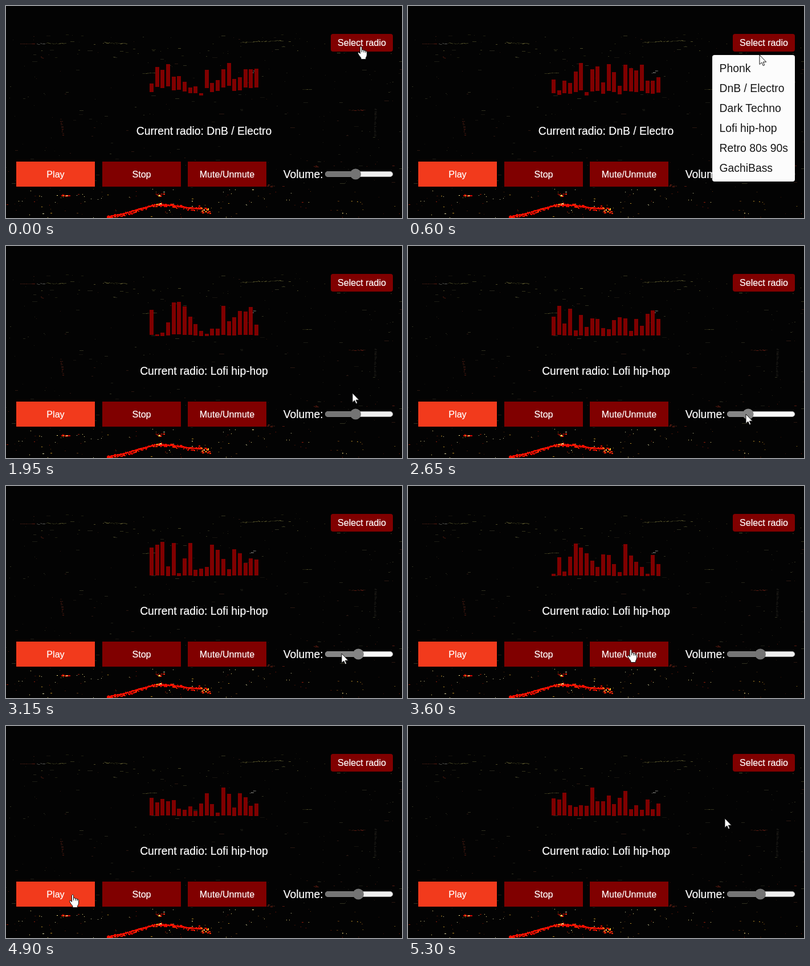
An HTML page for the animation above (5.35 s loop, 695 px wide and 372 px high).

```html
<!DOCTYPE html>
<html lang="en">
<head>
<meta charset="utf-8">
<title>Radio player</title>
<style>
html, body { margin: 0; width: 100%; height: 100%; overflow: hidden; background: #030303; }
svg { display: block; width: 695px; height: 372px; font-family: "Liberation Sans", Arial, sans-serif; }
text { fill: #fff; stroke: #fff; stroke-width: .2px; font-size: 16.1px; }
.big { font-size: 19.35px; }
.mid { text-anchor: middle; }
#menu text { fill: #161616; stroke: none; }
</style>
</head>
<body>
<svg viewBox="0 0 695 372" xmlns="http://www.w3.org/2000/svg">
  <rect width="695" height="372" fill="#030303"/>
  <g id="city" shape-rendering="crispEdges"></g>
  <g id="bars" fill="#800000" shape-rendering="crispEdges"></g>
  <text id="now" class="big mid" x="347.5" y="226"></text>
  <g id="buttons"></g>
  <text class="big" x="486.7" y="302">Volume:</text>
  <rect id="track" x="560.4" y="290.6" width="118.4" height="8.8" rx="4.4" stroke="#b8b8b8" stroke-width=".8"/>
  <rect id="level" x="560" y="290.2" height="9.6" rx="4.8"/>
  <circle id="knob" cy="295" r="9.6"/>
  <g id="menu">
    <rect x="534" y="86" width="145" height="222" rx="4" fill="#fcfcfc"/>
    <rect id="hover" x="540" width="133" height="35" fill="#c9c9c9"/>
  </g>
  <g id="cursor" fill="#fff" stroke="#111" stroke-linejoin="round">
    <path id="arrow" d="M0 0V16.500L3.800 13L6.300 18.700L8.700 17.700L6.300 12.200H11.700Z"/>
    <path id="hand" d="M-1.500 1Q0-1.500 1.500 1V6Q4 5 5 7Q7 6 8 8Q10.500 7.500 10.500 10V15Q10 18 8.500 20V22.500H0V20Q-3 16.500-5 13Q-6 10-4 10L-1.500 12.500ZM1.500 6v4M5 7v3.500M8 8v3"/>
  </g>
</svg>
<script>
const LOOP = 5350, STEP = 50;
const DARK = [128, 0, 0], LIT = [242, 58, 28];
const $ = id => document.getElementById(id);
const clamp = v => Math.max(0, Math.min(1, v));
const mix = (a, b, u) => a + (b - a) * u;
const ease = u => u * u * (3 - 2 * u);
const hash = (a, b) => {
  const v = Math.sin(a * 127.1 + b * 311.7) * 43758.5453;
  return v - Math.floor(v);
};
const pick = (list, u) => list[Math.floor(u * list.length)];

function set(el, attrs) {
  for (const k in attrs) el.setAttribute(k, attrs[k]);
}
function add(parent, tag, attrs, text) {
  const el = document.createElementNS("http://www.w3.org/2000/svg", tag);
  set(el, attrs);
  if (text) el.textContent = text;
  return parent.appendChild(el);
}
function dash(x, y, width, height, fill) {
  add($("city"), "rect", { x: Math.round(x), y: Math.round(y), width, height, fill });
}

// Loose city lights in a horizontal band
function scatter(count, seed, top, bottom, longest, colors) {
  for (let i = 1; i <= count; i++) {
    const r = n => hash(i, seed + n);
    const width = 1 + Math.floor(r(3) ** 3 * longest);
    dash(r(1) * 695, mix(top, bottom, r(2)), width, 1, pick(colors, r(4)));
  }
}
// Ragged streak of short dashes along a line
function streak(x1, y1, x2, y2, spread, colors) {
  const n = Math.ceil(Math.hypot(x2 - x1, y2 - y1) / 2);
  for (let i = 0; i <= n; i++) {
    const r = k => hash(i + x1, y1 + k);
    const x = mix(x1, x2, i / n), y = mix(y1, y2, i / n);
    dash(x, y + (r(1) - .5) * spread, 1 + Math.floor(r(2) * 4), spread > 3 ? 2 : 1, pick(colors, r(3)));
  }
}

const olive = ["#4b4824", "#34331c", "#20200f"];
const gray = ["#5c5c58", "#484845", "#383836"];
const rust = ["#58190f", "#3a1710", "#24100a"];
const fire = ["#ff0c00", "#f01000", "#ff2a06", "#d00800"];
const flame = ["#ffd23a", "#fff08a", "#ff7a14", "#ff1a00"];

scatter(250, 3, 48, 320, 9, ["#1c1c14", "#25241a", "#16130e", "#2b1710", "#30301f"]);
scatter(50, 11, 50, 90, 7, olive);
scatter(35, 17, 270, 322, 4, rust);
scatter(130, 29, 321, 371, 3, ["#ffe88a", "#b58a25", "#8c1a08", "#d8d3a0", "#5a3510", "#3a1408"]);

streak(25, 66, 48, 66, 1, rust);
streak(54, 66, 66, 66, 2, gray);
streak(70, 65, 104, 65, 2, olive);
streak(170, 64, 210, 66, 2, olive);
streak(412, 63, 483, 60, 2, olive);
streak(239, 118, 261, 117, 1, olive);
streak(428, 115, 436, 115, 5, gray);
streak(521, 146, 534, 146, 1, olive);
streak(602, 182, 628, 183, 2, rust);
streak(647, 180, 646, 228, 1, ["#1f1d19", "#121210"]);
streak(95, 199, 99, 225, 2, rust);
streak(61, 89, 64, 91, 3, rust);
streak(540, 280, 546, 283, 3, rust);
streak(458, 314, 469, 314, 4, rust);

// Glowing road
const road = [[177, 370], [205, 365], [232, 357], [262, 349], [292, 350], [318, 354], [345, 356]];
add($("city"), "polyline", {
  points: road.join(" "), fill: "none", stroke: fire[0], "stroke-width": 2.6, "stroke-linejoin": "round"
});
road.slice(1).forEach((p, i) => streak(...road[i], ...p, 6, fire));
streak(184, 368, 222, 362, 5, fire);
streak(338, 357, 357, 357, 14, fire);
streak(342, 356, 354, 358, 7, flame);
streak(262, 348, 272, 347, 4, flame);
for (const x of [97, 263]) {
  streak(x, 331, x + 13, 331, 5, fire);
  streak(x + 2, 331, x + 9, 331, 4, flame);
}

// Controls
const boxes = ["Play", "Stop", "Mute/Unmute"].map((label, i) => [Math.round(18 + 150.5 * i), 273, 138, 44, label]);
boxes.push([570, 49, 109, 31, "Select radio"]);
const buttons = boxes.map(([x, y, width, height, label]) => {
  const rect = add($("buttons"), "rect", { x, y, width, height, rx: height < 40 ? 4 : 0, fill: "#800000" });
  add($("buttons"), "text", { class: "mid", x: x + width / 2, y: y + height / 2 + 5.6 }, label);
  return rect;
});
["Phonk", "DnB / Electro", "Dark Techno", "Lofi hip-hop", "Retro 80s 90s", "GachiBass"]
  .forEach((name, i) => add($("menu"), "text", { class: "big", x: 546.5, y: 116 + 35 * i }, name));

// Equalizer: each bar eases between random heights; tall bars lift off the floor early on
const bars = Array.from({ length: 20 }, (_, i) =>
  add($("bars"), "rect", { x: Math.round(252 + 9.68 * i), width: 7 }));

function drawBars(t, power) {
  const beat = Math.floor(t / 150), u = ease(t / 150 - beat);
  const lift = .02 + .43 * Math.exp(-t / 700);
  $("bars").style.display = power > 0 ? "" : "none";
  bars.forEach((bar, i) => {
    const rise = power * mix(3, 62, mix(hash(i + 1, beat), hash(i + 1, beat + 1), u));
    const height = rise / (1 + lift);
    set(bar, { y: 158 - rise, height });
  });
}

// Pointer stops: time, x, y
const path = [
  [0, 623, 71], [550, 621, 62], [600, 617, 86], [1050, 607, 201], [1600, 607, 201], [2200, 609, 292],
  [2450, 645, 294], [2650, 593, 295], [2850, 572, 295], [3100, 614, 295], [3300, 455, 291],
  [3600, 391, 287], [3850, 244, 290], [4200, 244, 290], [4400, 128, 296], [5100, 114, 296], [5300, 556, 162]
];
function pointer(t) {
  const i = Math.max(1, path.findIndex(p => p[0] >= t));
  const a = path[i - 1], b = path[i];
  const u = ease((t - a[0]) / (b[0] - a[0]));
  return [mix(a[1], b[1], u), mix(a[2], b[2], u)];
}
const inside = (px, py, [x, y, w, h]) => px >= x && px <= x + w && py >= y && py <= y + h;
const shade = u => `rgb(${DARK.map((c, i) => mix(c, LIT[i], u))})`;

function draw(t) {
  const [x, y] = pointer(t);
  const stopped = clamp((t - 3850) / 150) - clamp((t - 4550) / 150);
  drawBars(t, 1 - stopped);
  set(buttons[0], { fill: shade(1 - stopped) });
  set(buttons[1], { fill: shade(stopped) });
  $("now").textContent = "Current radio: " + (t < 1550 ? "DnB / Electro" : "Lofi hip-hop");

  const open = t >= 300 && t < 1550;
  const row = Math.floor((y - 92) / 35);
  const onRow = open && row >= 0 && row < 6;
  $("menu").style.display = open ? "" : "none";
  $("hover").style.display = onRow ? "" : "none";
  set($("hover"), { y: 92 + 35 * row });

  const knob = t < 2200 ? 613.5 : t < 3100 ? x + 4 : 618.4;
  const active = inside(x, y, [560, 285, 119, 20]);
  const fill = active ? "#858585" : "#747474";
  set($("track"), { fill: active ? "#fafafa" : "#efefef" });
  set($("level"), { width: knob - 560, fill });
  set($("knob"), { cx: knob, fill });

  const hand = onRow || boxes.some(box => inside(x, y, box));
  $("hand").style.display = hand ? "" : "none";
  $("arrow").style.display = hand ? "none" : "";
  set($("cursor"), { transform: `translate(${Math.round(x)} ${Math.round(y)})` });
}

const start = performance.now();
function tick() {
  const t = (performance.now() - start) % LOOP;
  draw(Math.floor(t / STEP) * STEP);
  requestAnimationFrame(tick);
}
tick();
</script>
</body>
</html>
```
